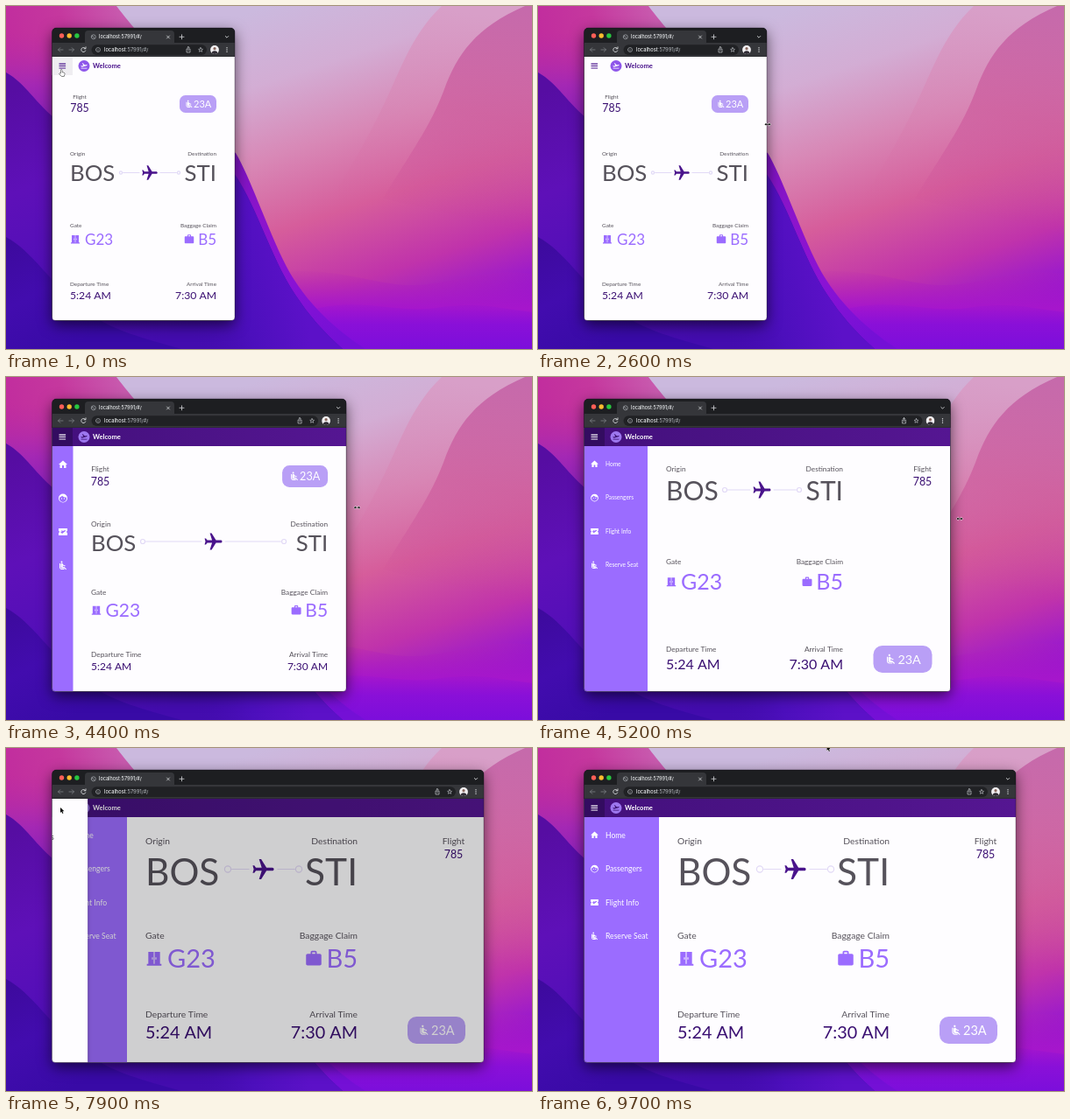
These frames come from a looping animation (600x392 px, 9.8 s). An HTML page with a canvas:

```html
<!DOCTYPE html>
<html lang="en">
<head>
<meta charset="utf-8">
<title>Responsive boarding app</title>
<style>
html, body { margin: 0; width: 100%; height: 100%; overflow: hidden; background: #4a10a8; }
canvas { display: block; width: 600px; height: 392px; }
</style>
</head>
<body>
<canvas id="stage"></canvas>
<script>
const W = 600, H = 392, LOOP = 9800, STEP = 100;
const X0 = 52.5, TOP = 25, BODY = 58, BOTTOM = 359.5, DRAWER = 127;
const VIOLET = '#9b6cff', DEEP = '#4a148c', INK = '#3a0f72', GREY = '#56525b', WHITE = '#fff';
const APP = 'Lato, "Open Sans", sans-serif', UI = 'Inter, Roboto, sans-serif';

const canvas = document.getElementById('stage');
const dpr = window.devicePixelRatio || 1;
canvas.width = W * dpr;
canvas.height = H * dpr;
let c = canvas.getContext('2d');

const icons = {
  plane: 'M21 16v-2l-8-5V3.5c0-.83-.67-1.5-1.5-1.5S10 2.67 10 3.5V9l-8 5v2l8-2.5V19l-2 1.5V22l3.5-1 3.5 1v-1.5L13 19v-5.5l8 2.5z',
  takeoff: 'M2.5 19h19v2h-19zm19.57-9.36c-.21-.8-1.04-1.28-1.84-1.06L14.92 10l-6.9-6.43-1.93.51 4.14 7.17-4.97 1.33-1.97-1.54-1.45.39 2.59 4.49 16-4.27c.81-.23 1.28-1.05 1.07-1.85z',
  home: 'M10 20v-6h4v6h5v-8h3L12 3 2 12h3v8z',
  face: 'M12 2a10 10 0 1 0 0 20a10 10 0 0 0 0-20zM10 6c2 3 5 4 9.5 4a8 8 0 1 1-15 0c3-.5 4.5-2 5.5-4zM9 11.5a1.3 1.3 0 1 0 0 2.6a1.3 1.3 0 0 0 0-2.6zM15 11.5a1.3 1.3 0 1 0 0 2.6a1.3 1.3 0 0 0 0-2.6z',
  ticket: 'M2 4h20v6a2 2 0 0 0 0 4v6H2v-6a2 2 0 0 0 0-4zM6 12l4 4 8-6-1-2-5 2-4-2 2 4-2-1z',
  seat: 'M7.59 5.41c-.78-.78-.78-2.05 0-2.83s2.05-.78 2.83 0 .78 2.05 0 2.83-2.05.79-2.83 0zM6 16V7H4v9c0 2.76 2.24 5 5 5h6v-2H9c-1.66 0-3-1.34-3-3zm14 4.07L14.93 15H11.5v-3.68c1.4 1.15 3.6 2.16 5.5 2.16v-2.16c-1.66.02-3.61-.87-4.67-2.04l-1.4-1.55c-.19-.21-.43-.38-.69-.5-.29-.14-.62-.23-.96-.23C8.01 7 7 8.01 7 9.25V15c0 1.66 1.34 3 3 3h5.07l3.5 3.5z',
  gear: 'M10 2h4l.6 3 2 1.2 2.9-1 2 3.5-2.3 2v2.6l2.3 2-2 3.5-2.9-1-2 1.2-.6 3h-4l-.6-3-2-1.2-2.9 1-2-3.5 2.3-2v-2.6l-2.3-2 2-3.5 2.9 1 2-1.2zM12 8.5a3.5 3.5 0 1 0 0 7a3.5 3.5 0 0 0 0-7z',
  pass: 'M3 3h8v8H3zM5 5v4h4V5zM13 3h8v8h-8zM15 5v4h4V5zM3 13h8v8H3zM5 15v4h4v-4zM13 13h3v3h-3zM18 13h3v3h-3zM13 18h3v3h-3zM18 18h3v3h-3z',
  door: 'M4 3h7.4v16.5H4zM12.6 3H20v16.5h-7.4zM9 10.5v3h1.2v-3zM13.8 10.5v3H15v-3zM2 19.5h20V22H2z',
  bag: 'M20 6h-4V4c0-1.11-.89-2-2-2h-4c-1.11 0-2 .89-2 2v2H4c-1.11 0-2 .89-2 2v11c0 1.11.89 2 2 2h16c1.11 0 2-.89 2-2V8c0-1.11-.89-2-2-2zm-6 0h-4V4h4v2z',
  star: 'M12 3l2.7 6 6.3.6-4.8 4.3 1.4 6.4L12 17l-5.6 3.3 1.4-6.4L3 9.6 9.3 9z',
  arrow: 'M0 0v15l3.5-3.3 2.5 5.6 2.6-1.2-2.5-5.4H11z',
  hand: 'M5 1a1.6 1.6 0 0 1 3.2 0v6l6 1.5q2 .7 1.6 3L14.5 18H7L1 11q1-2 4 .5z',
  resize: 'M0 6l5-4v3h8V2l5 4-5 4V7H5v3z'
};
for (const k in icons) icons[k] = new Path2D(icons[k]);

const menu = [['home', 'Home'], ['face', 'Passengers'], ['ticket', 'Flight Info'],
  ['seat', 'Reserve Seat'], ['gear', 'Settings'], ['pass', 'Boarding Pass']];

// Measures for each breakpoint; the wide one runs between two sizes.
const compact = { label: 6.4, big: 25.8, fx: 84, fy: 104, fv: 117, oy: 169, ov: 190.5, line: 190.5,
  n1: 58, n2: 43, nr: 1.6, plane: 21, gy: 251, gv: 266.5, gate: 17, icon: 12, gi: 6, gx: 17, bi: 31,
  dy: 318, dv: 330.5, time: 12.2, bw: 42, bh: 20, by: 102, seat: 11, bt: 16, badge: 11 };
const rail = { label: 8.3, big: 25.8, fx: 107.5, fy: 105, fv: 119.5, oy: 168, ov: 190, line: 188,
  n1: 59, n2: 50, nr: 2.5, plane: 24, gy: 246.5, gv: 266.5, gate: 21, icon: 12.5, gi: 6, gx: 16.5, bi: 36,
  dy: 317, dv: 331, time: 12, bw: 52, bh: 25, by: 101, seat: 14, bt: 20, badge: 12.6 };
const wideA = { left: 146, right: 348, side: 72, item: 6.6, label: 8.3, big: 30, fx: 438.5, fy: 105, fv: 119.5,
  oy: 105.5, ov: 130.5, line: 129, n1: 67, n2: 50, nr: 2.5, plane: 24, gy: 211.5, gv: 234, gate: 25, icon: 12.5,
  gi: 6, gx: 17, bi: 41, dy: 311, dv: 328, time: 16, bw: 67, bh: 31, by: 307, seat: 20, bt: 28, badge: 14.3 };
const wideB = { left: 159, right: 401, side: 85, item: 8.6, label: 10.3, big: 42.4, fx: 510.5, fy: 106.5, fv: 122,
  oy: 106.5, ov: 142, line: 138.5, n1: 94, n2: 67, nr: 3.6, plane: 29, gy: 214, gv: 240.5, gate: 29, icon: 20,
  gi: 10, gx: 25, bi: 50, dy: 304.5, dv: 325, time: 19.8, bw: 66, bh: 31, by: 307, seat: 19, bt: 27, badge: 14.5 };

const mouse = [[0, 60.5, 73], [1100, 62, 73], [1600, 199, 78], [1900, 200, 78], [2500, 262, 135], [2900, 262, 136],
  [3700, 330, 138], [5200, 481, 162], [6000, 556, 162], [6300, 556, 160], [6800, 185.5, 73], [7100, 62, 68],
  [8400, 62, 68], [8700, 220, 140], [9000, 222, 140], [9700, 329.5, -3]];
const edge = [[2900, 261], [3700, 316], [5200, 470.5], [6000, 545]];
const slide = [[500, 0], [750, 1], [1750, 1], [2000, 0], [7820, 0], [8070, 1], [8880, 1], [9130, 0]];

const mix = (a, b, k) => a + (b - a) * k;
function at(keys, t, i = 1) {
  if (t <= keys[0][0]) return keys[0][i];
  const n = keys.findIndex(k => k[0] > t);
  if (n < 0) return keys[keys.length - 1][i];
  const a = keys[n - 1], b = keys[n];
  return mix(a[i], b[i], (t - a[0]) / (b[0] - a[0]));
}

function grad(x0, y0, x1, y1, ...cols) {
  const g = c.createLinearGradient(x0, y0, x1, y1);
  cols.forEach((col, i) => g.addColorStop(i / (cols.length - 1), col));
  return g;
}
function rect(x, y, w, h, fill, r = 0) {
  c.fillStyle = fill;
  c.beginPath();
  c.roundRect(x, y, w, h, r);
  c.fill();
}
function disc(x, y, r, fill) {
  c.fillStyle = fill;
  c.beginPath();
  c.arc(x, y, r, 0, 7);
  c.fill();
}
function stroke(d, color, width = 1) {
  c.strokeStyle = color;
  c.lineWidth = width;
  c.stroke(new Path2D(d));
}
function text(s, x, mid, size, color, align = 'left', weight = 400, font = APP) {
  c.font = `${weight} ${size}px ${font}`;
  c.fillStyle = color;
  c.textAlign = align;
  c.fillText(s, x, mid + size * 0.36);
}
function icon(name, x, y, size, color, turn = 0) {
  c.save();
  c.translate(x, y);
  c.rotate(turn);
  c.scale(size / 24, size / 24);
  c.translate(-12, -12);
  c.fillStyle = color;
  c.fill(icons[name], 'evenodd');
  c.restore();
}

function wallpaper() {
  const hill = (d, fill) => { c.fillStyle = fill; c.fill(new Path2D(d)); };
  hill('M0 0H600V392H0z', grad(300, 0, 430, 392, '#cbb9de', '#d3add4', '#d888b6', '#d65d9b', '#c033ab', '#8a0edb'));
  // Folds that fade out downwards.
  hill('M497 0C460 35 448 80 425 125S375 220 320 290H600V0z',
    grad(470, 0, 440, 230, '#d89fc8', '#d884b380', '#d65d9b00'));
  hill('M592 0C535 25 515 55 500 95S470 155 430 220L600 260V0z',
    grad(570, 0, 520, 250, '#c66aab', '#cb5599a0', '#c8409400'));
  // Low waves on the right.
  hill('M310 305C380 295 430 325 480 318S560 300 600 306V392H310z',
    grad(0, 300, 0, 392, '#b322b600', '#a616cc', '#840edc'));
  hill('M340 350C400 330 440 352 490 345S560 345 600 350V392H340z',
    grad(0, 335, 0, 392, '#9a14d000', '#8a10d8', '#7c0edb'));
  // Ridges on the left.
  hill('M0 0H126C160 45 200 80 262 175L300 392H0z',
    grad(0, 40, 130, 0, '#c12c9e', '#c5389e', '#c85aae'));
  hill('M0 30H52V160H0z', grad(0, 30, 0, 150, '#b92ca400', '#a428b4', '#7d1cc0'));
  hill('M0 76C22 88 34 112 60 132S180 120 262 168C278 195 296 248 316 290S370 366 410 392H0z',
    grad(262, 168, 350, 392, '#7c14c0', '#8c14cc', '#8a12d4', '#7410d6'));
  hill('M0 76C22 88 34 112 60 132S180 140 255 184C285 222 300 285 330 330Q352 364 384 392H0z',
    grad(20, 90, 150, 392, '#560da2', '#5e10b8', '#500eb8', '#430cae'));
  hill('M250 178C285 222 300 285 330 330Q352 364 384 392H200z',
    grad(200, 330, 330, 300, '#430cae00', '#4c0fbc', '#5c11c8'));
  hill('M0 264C30 280 52 318 86 345S160 380 200 392H0z',
    grad(0, 264, 70, 392, '#3d0a9c', '#420cae', '#380aa6'));
}

function browser(r) {
  const pale = '#d5d7da', dim = '#7d8085';
  rect(X0, TOP, r - X0, 18, '#1d1e21');
  rect(90, 28, 102, 18, '#35363a', 4);
  rect(X0, 42, r - X0, 16, '#35363a');
  ['#ff5f57', '#febc2e', '#28c840'].forEach((col, i) => disc(63.5 + i * 8.7, 34, 2.7, col));
  c.lineCap = 'round';
  stroke('M97.3 35.3a2.5 2.5 0 1 0 5 0a2.5 2.5 0 1 0-5 0M98 34l3 2.5', '#9da1a6', 0.8);
  text('localhost:57991/#/', 106, 35.3, 5.5, '#eceef0', 'left', 500, UI);
  stroke('M183.5 34l3 3m0-3l-3 3M198 35.3h5m-2.5-2.5v5', pale, 0.8);
  stroke('M65 50h-5.5m2.3-2.3l-2.3 2.3 2.3 2.3M72 50h5.5m-2.3-2.3l2.3 2.3-2.3 2.3', dim, 0.8);
  stroke('M90.6 48.6a2.6 2.6 0 1 0 .2 2.4M91 46.8v2h-2', pale, 0.9);
  rect(97.5, 44.3, r - 32 - 97.5, 11.6, '#202124', 5.8);
  stroke('M102.5 50a2.5 2.5 0 1 0 5 0a2.5 2.5 0 1 0-5 0M105 49.8v1.3', '#a9adb2', 0.7);
  text('localhost', 112, 50, 5.7, '#eceef0', 'left', 500, UI);
  const host = c.measureText('localhost').width;
  text(':57991/#/', 112 + host, 50, 5.7, '#a9adb2', 'left', 500, UI);
  c.save();
  c.translate(r, 0);
  stroke('M-54 49h-1v4h4v-4h-1m-1 2v-4.5m-1.2 1.2l1.2-1.2 1.2 1.2', '#c3c6ca', 0.7);
  c.save();
  c.translate(-42.2, 46.8);
  c.scale(0.27, 0.27);
  c.strokeStyle = '#c3c6ca';
  c.lineWidth = 2.4;
  c.stroke(icons.star);
  c.restore();
  stroke('M-10.7 34.5l1.7 1.7 1.7-1.7', pale, 0.9);
  for (let i = -1; i < 2; i++) disc(-9, 50 + i * 2.2, 0.7, pale);
  c.beginPath();
  c.arc(-23, 50, 4.9, 0, 7);
  c.clip();
  rect(-28, 45, 10, 10, '#f2f0f2');
  disc(-23, 48.7, 1.6, '#8a6a60');
  disc(-23, 54.6, 3.4, '#2f2b34');
  c.restore();
  rect(X0, 57.6, r - X0, 0.4, '#242528');
}

function header(r, mobile, hover) {
  const ink = mobile ? DEEP : WHITE;
  if (!mobile) {
    rect(X0, BODY, r - X0, 21, grad(X0, 0, r, 0, '#43107c', '#551692'));
    rect(X0, BODY, 23.5, 21, '#330c60');
  } else if (hover) rect(X0, BODY, 23.5, 21, '#efedf1');
  for (let i = 0; i < 3; i++) rect(60.5, 65.6 + i * 2.4, 7.6, 1.1, ink);
  disc(89, 68.5, 6.5, mobile ? '#8e56ea' : '#9d77ef');
  icon('takeoff', 89, 68.3, 8.5, mobile ? WHITE : '#3b1070');
  text('Welcome', 99, 68.7, 7.6, ink, 'left', 700);
}

function sidebar(width, size) {
  rect(X0, 79, width + 0.5, BOTTOM - 79, VIOLET);
  menu.slice(0, 4).forEach(([name, label], i) => {
    const y = (size ? 99.5 : 100) + i * 38.5;
    icon(name, size ? 64.5 : 65, y, size ? 10.5 : 12, WHITE);
    if (size) text(label, 77, y, size, WHITE);
  });
}

function pair(m, x, align, label, y, value, vy, size, color, vx = x) {
  text(label, x, y, m.label, GREY, align);
  text(value, vx, vy, size, color, align);
}

function page(m, left, right, badgeX) {
  pair(m, m.fx, 'center', 'Flight', m.fy, '785', m.fv, 12.4, INK);
  pair(m, left, 'left', 'Origin', m.oy, 'BOS', m.ov, m.big, GREY);
  pair(m, right, 'right', 'Destination', m.oy, 'STI', m.ov, m.big, GREY);

  const a = left + m.n1, b = right - m.n2, gap = m.nr + 1;
  c.strokeStyle = '#e2daf6';
  c.lineWidth = 1.2;
  c.beginPath();
  c.moveTo(a + gap, m.line);
  c.lineTo(b - gap, m.line);
  c.stroke();
  for (const x of [a, b]) {
    c.beginPath();
    c.arc(x, m.line, m.nr, 0, 7);
    c.stroke();
  }
  rect((a + b) / 2 - m.plane * 0.55, m.line - 2, m.plane * 1.1, 4, '#fefdff');
  icon('plane', (a + b) / 2, m.line + 0.02 * m.plane, m.plane, DEEP, Math.PI / 2);

  pair(m, left, 'left', 'Gate', m.gy, 'G23', m.gv, m.gate, VIOLET, left + m.gx);
  icon('door', left + m.gi, m.gv, m.icon, VIOLET);
  pair(m, right, 'right', 'Baggage Claim', m.gy, 'B5', m.gv, m.gate, VIOLET);
  icon('bag', right - m.bi, m.gv, m.icon * 1.05, VIOLET);
  pair(m, left, 'left', 'Departure Time', m.dy, '5:24 AM', m.dv, m.time, INK);
  pair(m, right, 'right', 'Arrival Time', m.dy, '7:30 AM', m.dv, m.time, INK);

  const mid = m.by + m.bh / 2;
  rect(badgeX, m.by, m.bw, m.bh, '#b99ff6', m.bh * 0.33);
  icon('seat', badgeX + m.seat, mid, m.badge * 0.95, WHITE);
  text('23A', badgeX + m.bt, mid + 0.3, m.badge, WHITE);
}

function drawer(p, r, mobile) {
  if (p <= 0) return;
  rect(X0, BODY, r - X0, BOTTOM - BODY, `rgba(0,0,0,${0.58 * p})`);
  c.save();
  c.translate(X0 - DRAWER * (1 - p), 0);
  c.shadowColor = 'rgba(0,0,0,.4)';
  c.shadowBlur = 4 * dpr;
  rect(0, BODY, DRAWER, BOTTOM - BODY, mobile ? VIOLET : '#fefdff');
  c.shadowColor = 'transparent';
  (mobile ? menu : menu.slice(4)).forEach(([name, label], i) => {
    const y = (mobile ? 80 : 83) + i * 19.2, ink = mobile ? WHITE : '#3a3540';
    icon(name, 20.7, y, 9, mobile ? WHITE : DEEP);
    text(label, mobile ? 33.5 : 36, y, 8.6, ink);
  });
  disc(27.3, 332, 14.6, DEEP);
  icon('takeoff', 27.3, 331.5, 18, WHITE);
  c.restore();
}

function pointer(t, p) {
  const x = at(mouse, t, 1), y = at(mouse, t, 2);
  const onMenu = x < 76 && y > 58 && y < 79 && p === 0;
  const kind = t >= 2500 && t < 6400 ? 'resize' : onMenu ? 'hand' : 'arrow';
  c.save();
  c.translate(x, y);
  c.scale(0.4, 0.4);
  if (kind === 'resize') c.translate(-9, -6);
  c.lineJoin = 'round';
  c.strokeStyle = kind === 'hand' ? '#111' : WHITE;
  c.lineWidth = 2.4;
  c.stroke(icons[kind]);
  c.fillStyle = kind === 'hand' ? WHITE : '#0a0a0a';
  c.fill(icons[kind]);
  c.restore();
}

function app(r, hover) {
  const mobile = r < 303;
  rect(X0, BODY, r - X0, BOTTOM - BODY, '#fefdff');
  header(r, mobile, hover);
  if (r < 403) {
    const m = mobile ? compact : rail;
    if (!mobile) sidebar(23.5, 0);
    page(m, mobile ? 73 : 97, r - 21, r - 21 - m.bw);
  } else {
    const k = (r - 470.5) / 74.5, m = {};
    for (const key in wideA) m[key] = mix(wideA[key], wideB[key], k);
    sidebar(m.side, m.item);
    page(m, m.left, m.right, r - 21 - m.bw);
  }
}

// The wallpaper never changes, so it is painted once.
const back = document.createElement('canvas');
back.width = canvas.width;
back.height = canvas.height;
const front = c;
c = back.getContext('2d');
c.scale(dpr, dpr);
wallpaper();
c = front;
c.scale(dpr, dpr);

function draw(t) {
  const r = at(edge, t), p = at(slide, t), mobile = r < 303;
  c.drawImage(back, 0, 0, W, H);
  c.save();
  c.shadowColor = 'rgba(0,0,0,.6)';
  c.shadowBlur = 16 * dpr;
  c.shadowOffsetY = 5 * dpr;
  rect(X0, TOP, r - X0, BOTTOM - TOP, '#1d1e21', 5);
  c.restore();
  c.save();
  c.beginPath();
  c.roundRect(X0, TOP, r - X0, BOTTOM - TOP, [5, 5, 4, 4]);
  c.clip();
  browser(r);
  app(r, t < 1200);
  drawer(p, r, mobile);
  c.restore();
  c.strokeStyle = 'rgba(20,10,30,.55)';
  c.lineWidth = 0.6;
  c.beginPath();
  c.roundRect(X0, TOP, r - X0, BOTTOM - TOP, [5, 5, 4, 4]);
  c.stroke();
  pointer(t, p);
}

const start = performance.now();
function tick() {
  const t = (performance.now() - start) % LOOP;
  draw(Math.floor(t / STEP) * STEP);
  requestAnimationFrame(tick);
}
tick();
</script>
</body>
</html>
```
